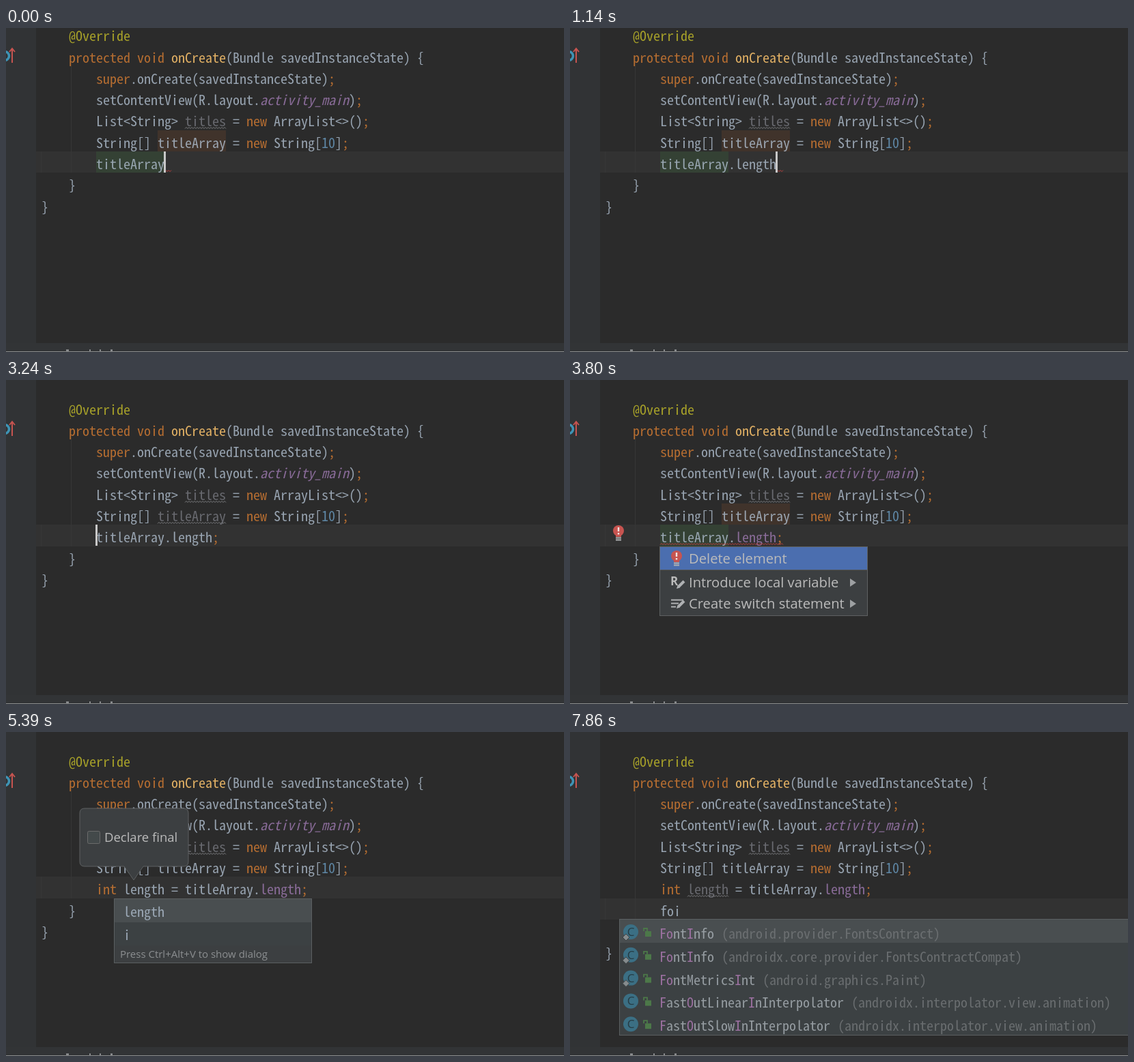
An HTML page for the animation above (8000 ms loop, 817 by 475 pixels).

```html
<!DOCTYPE html>
<html lang="en">
<head>
<meta charset="utf-8">
<title>Code editor</title>
<style>
html, body { margin: 0; width: 100%; height: 100%; overflow: hidden; background: #2b2b2b; }
svg { display: block; width: 817px; height: 475px; }
text { white-space: pre; }
.code { font-family: "Noto Sans Mono CJK SC", "Liberation Mono", monospace; fill: #a9b7c6; fill-opacity: .86; font-variant-ligatures: none; }
.ui { font-family: "Open Sans", "Noto Sans", sans-serif; font-size: 20.2px; fill: #bbbbbb; }
</style>
</head>
<body>
<svg id="stage" width="817" height="475"></svg>
<script>
const LOOP = 8000, CELL = 10, LEFT = 52, PITCH = 31.3, BASELINE = 26;
const stage = document.getElementById('stage');

const HEAD = [
  '    @Override',
  '    protected void onCreate(Bundle savedInstanceState) {',
  '        super.onCreate(savedInstanceState);',
  '        setContentView(R.layout.activity_main);',
  '        List<String> titles = new ArrayList<>();',
  '        String[] titleArray = new String[10];'
];
const PAD = '        ';
const USE = PAD + 'titleArray.length;';
const DECL = PAD + 'int length = titleArray.length;';

const MEMBERS = [
  ['f', 'length', ''], ['m', 'clone', '()'], ['m', 'equals', '(Object obj)'], ['m', 'hashCode', '()'],
  ['m', 'toString', '()'], ['m', 'getClass', '()'], ['m', 'notify', '()'], ['m', 'notifyAll', '()']
];
const LOOPS = [
  ['t', 'for', '', 'fo'], ['t', 'fori', 'Create iteration loop', 'fo'], ['t', 'foreach', 'Iterate collection', 'fo'],
  ['c', 'FontInfo', '(android.provider.FontsContract)', 'Fo'],
  ['c', 'Formatter', '(java.util)', 'Fo'], ['c', 'FontMetrics', '(android.graphics.Paint)', 'Fo']
];
const CLASSES = [
  ['s', 'FontInfo', '(android.provider.FontsContract)', 'FoI'],
  ['s', 'FontInfo', '(androidx.core.provider.FontsContractCompat)', 'FoI'],
  ['s', 'FontMetricsInt', '(android.graphics.Paint)', 'FoI'],
  ['c', 'FastOutLinearInInterpolator', '(androidx.interpolator.view.animation)', 'FOI'],
  ['c', 'FastOutSlowInInterpolator', '(androidx.interpolator.view.animation)', 'FOI']
];

// Each step changes only the named parts of the state before it.
const STEPS = [
  [0, { scroll: 0, body: [PAD + 'titleArray'], line: 6, caret: 18, marked: true, error: [18, 19] }],
  [280, { body: [PAD + 'titleArray.'], caret: 19, error: [19, 20] }],
  [400, { list: { x: 182, y: 212, items: MEMBERS } }],
  [990, { caret: null }],
  [1140, { body: [PAD + 'titleArray.length'], caret: 25, error: [25, 26], list: null }],
  [1510, { body: [USE], caret: 26, error: [8, 26], marked: false, resolved: true }],
  [1880, { bulb: true }],
  [2000, { caret: null, menu: { x: 310, y: 211, row: 0 } }],
  [2440, { scroll: 1, body: [], caret: 4, error: null, bulb: false, menu: null, braces: true, resolved: false }],
  [2710, { unusedArray: true }],
  [3240, { body: [USE], caret: 8, braces: false }],
  [3520, { unusedArray: false, marked: true, error: [8, 26], resolved: true }],
  [3800, { caret: null, bulb: true, menu: { x: 131, y: 244, row: 0 } }],
  [4380, { menu: { x: 131, y: 244, row: 1 } }],
  [4790, { menu: null }],
  [4940, { body: [DECL], caret: 18, bulb: false, marked: false, error: null, balloon: .5, names: true }],
  [5090, { balloon: 1 }],
  [5390, { caret: null }],
  [5950, { names: false, balloon: .5, caret: 18 }],
  [6070, { balloon: 0, caret: 39 }],
  [6190, { body: [DECL, ''], line: 7, caret: 8 }],
  [6310, { unusedLength: true }],
  [6720, { body: [DECL, PAD + 'f'], caret: 9 }],
  [6870, { body: [DECL, PAD + 'fo'], caret: 10, list: { x: 72, y: 274, items: LOOPS } }],
  [7020, { body: [DECL, PAD + 'foi'], caret: 11 }],
  [7140, { list: { x: 72, y: 274, items: CLASSES } }],
  [7860, { caret: null }]
];
const states = [];
STEPS.forEach(([time, change], i) => states.push({ ...states[i - 1], ...change, time }));

const pen = document.createElement('canvas').getContext('2d');
pen.font = '100px "Noto Sans Mono CJK SC", "Liberation Mono", monospace';
const codeSize = CELL * 100 / pen.measureText('0').width;

const esc = s => s.replace(/&/g, '&amp;').replace(/</g, '&lt;').replace(/>/g, '&gt;');
const colX = col => LEFT + col * CELL;
const box = (x, y, w, h, fill, more = '') => `<rect x="${x}" y="${y}" width="${w}" height="${h}" fill="${fill}" ${more}/>`;
const path = (d, stroke, width = 1, more = '') => `<path d="${d}" fill="none" stroke="${stroke}" stroke-width="${width}" ${more}/>`;
const label = (x, y, s, more = '') => `<text class="ui" x="${x}" y="${y}" ${more}>${esc(s)}</text>`;
const span = (s, fill, more = '') => `<tspan fill="${fill}" ${more}>${esc(s)}</tspan>`;
const codeText = (x, y, inner) => `<text class="code" font-size="${codeSize}" x="${x}" y="${y}">${inner}</text>`;

function wave(from, to, y, color) {
  let d = `M${from} ${y + 2}`;
  for (let x = from + 2, up = true; x <= to; x += 2, up = !up) d += `L${x} ${up ? y : y + 2}`;
  return path(d, color);
}

function colored(text, row, s) {
  const words = /@\w+|\w+|;|[^\w;@]+/g;
  return text.replace(words, (w, at) => {
    const before = text.slice(0, at);
    if (w === '@Override') return span(w, '#bbb529');
    if (/^(protected|void|super|new|int|;)$/.test(w)) return span(w, '#cc7832');
    if (w === 'onCreate' && row === 1) return span(w, '#ffc66d');
    if (w === 'activity_main') return span(w, '#9876aa', 'font-style="italic"');
    if (w === '10') return span(w, '#6897bb');
    if (w === 'length' && before.endsWith('.') && s.resolved) return span(w, '#9876aa');
    const unused = w === 'titles' || (w === 'titleArray' && row === 5 && s.unusedArray) ||
      (w === 'length' && before.endsWith('int ') && s.unusedLength);
    return unused ? span(w, '#72737a') : esc(w);
  });
}

function bulb(x, y) {
  return `<circle cx="${x}" cy="${y - 3}" r="8" fill="#c75450"/>` +
    box(x - 4, y + 2, 8, 4, '#c75450') +
    path(`M${x} ${y - 8}v6M${x} ${y}v2.5`, '#f0e4e2', 2.4) +
    path(`M${x - 4} ${y + 7.5}h8M${x - 4} ${y + 10.5}h8`, '#afb1b3', 1.8);
}

function pencil(x, y) {
  return path(`M${x} ${y}l8 -8`, '#afb1b3', 4) + `<path d="M${x - 3} ${y + 3}l1.5 -5 3.5 3.5z" fill="#afb1b3"/>`;
}

function menu({ x, y, row }) {
  const arrow = dy => `<path d="M279 ${dy - 6}l9 6 -9 6z" fill="#9da0a2"/>`;
  const tops = [1, 36, 68];
  return `<g transform="translate(${x} ${y})">` +
    box(.5, .5, 304, 101, '#3c3f41', 'stroke="#5e6162"') +
    box(1, tops[row], 303, row ? 32 : 33, '#4b6eaf') +
    path('M1 34.5H304', '#515456') +
    bulb(25, 17) +
    label(43, 25, 'Delete element') + label(43, 60, 'Introduce local variable') + label(43, 91, 'Create switch statement') +
    label(16, 57, 'R', 'style="font-size:17px;font-weight:700"') + pencil(28, 59) +
    path('M17 78.5h18M17 83.5h11M17 88.5h7', '#afb1b3', 2) + pencil(28, 88) +
    arrow(53) + arrow(84) + '</g>';
}

function icon(kind, x, y) {
  const [fill, letter] = { f: ['#967c40', 'f'], m: ['#93565f', 'm'], c: ['#3b6f84', 'C'], s: ['#3b6f84', 'C'], t: ['#63686a', ''] }[kind];
  let out = `<circle cx="${x}" cy="${y}" r="11" fill="${fill}"/>` +
    label(x, y + 6, letter, 'text-anchor="middle" style="font-size:17px;fill:#263b43"');
  if (kind === 's') out += `<path d="M${x - 7} ${y + 3}l5 5 -5 5 -5 -5z" fill="#858b8d" stroke="#3c4143"/>`;
  if (kind !== 't') {
    out += box(x + 21, y - 1, 9, 8, '#4c7849') + path(`M${x + 19} ${y - 1}v-4h5v4`, '#4c7849', 1.8);
  }
  return out;
}

function matched(name, letters) {
  let next = 0;
  return [...name].map(ch => ch === letters[next] ? (next++, span(ch, '#ab78b0')) : esc(ch)).join('');
}

function list({ x, y, items }) {
  const height = items.length * 34;
  let out = box(x + .5, y + .5, 760, height, '#3c4143', 'stroke="#5b5f61"') + box(x + 1, y + 1, 760, 34, '#494e50');
  items.forEach(([kind, name, tail, letters = ''], i) => {
    const base = y + 29 + i * 33.8;
    const nameX = x + 59;
    out += icon(kind, x + 17, base - 10) + codeText(nameX, base, span(name, '#a4abb1').replace(esc(name), matched(name, letters))) +
      codeText(nameX + name.length * CELL + (kind === 'm' ? 0 : 11), base, span(tail, '#717577'));
  });
  return out;
}

function nameList() {
  return box(158.5, 244.5, 289, 94, '#3c4143', 'stroke="#5b5f61"') + box(159, 245, 288, 34, '#494e50') +
    codeText(172, 271, 'length') + codeText(172, 305, 'i') +
    box(159, 313, 288, 25, '#3c3f41') +
    label(167, 331, 'Press Ctrl+Alt+V to show dialog', 'style="font-size:15px;fill:#8c8f91"');
}

function balloon(opacity) {
  return `<g opacity="${opacity}"><path d="M115 112H260q7 0 7 7V190q0 7 -7 7H201L187 217L173 197H115q-7 0 -7 -7V119q0 -7 7 -7z" fill="#3c3f41" stroke="#5e6162"/>` +
    box(119.5, 145.5, 18, 18, '#43494a', 'rx="2" stroke="#6b6b6b"') +
    label(144, 161, 'Declare final', 'style="font-size:18.5px"') + '</g>';
}

function gutter(shift) {
  const y = 41 + shift;
  return box(0, 0, 44, 462, '#313335') +
    `<circle cx="-2" cy="${y}" r="6.5" fill="none" stroke="#3e93b5" stroke-width="3.5"/>` +
    path(`M9 ${y + 10}V${y - 10}M5 ${y - 6}l4 -5 4 5`, '#c75450', 2);
}

function frame(s) {
  const rows = [...HEAD, ...s.body, '    }', '}'];
  const top = row => Math.round(181 + PITCH * (row - 6 + s.scroll));
  const end = rows.length - 2;
  const mark = (row, from, to, fill) => box(colX(from), top(row), (to - from) * CELL, top(row + 1) - top(row), fill);
  const under = (row, from, to, color) => wave(colX(from), colX(to), top(row) + 27.5, color);

  let out = box(0, 0, 817, 475, '#2b2b2b') + gutter(s.scroll * 31);
  out += box(44, top(s.line), 773, top(s.line + 1) - top(s.line), '#323232');
  out += path(`M95.5 ${top(2)}V${top(end)}M51.5 ${top(s.line)}V${top(s.line + 1)}`, '#373737');

  if (s.marked) out += mark(5, 17, 27, '#40332b') + mark(6, 8, 18, '#344134');
  if (s.braces) {
    out += mark(1, 55, 56, '#3b514d') + mark(end, 4, 5, '#3b514d') + box(27, top(1), 3, top(end + 1) - top(1), '#3b514d');
  }

  rows.forEach((text, row) => {
    const indent = text.length - text.trimStart().length;
    const inner = s.braces && row === end ? span('}', '#ffef28')
      : colored(text.slice(indent), row, s);
    out += codeText(colX(indent), top(row) + BASELINE, inner);
  });
  if (s.braces) out += codeText(colX(55), top(1) + BASELINE, span('{', '#ffef28'));

  out += under(4, 21, 27, '#7c7d80');
  if (s.unusedArray) out += under(5, 17, 27, '#7c7d80');
  if (s.unusedLength) out += under(6, 12, 18, '#7c7d80');
  if (s.error) out += under(6, ...s.error, '#bc3f3c');
  if (s.caret != null) out += box(colX(s.caret) - 1, top(s.line), 3, 31, '#c8c8c8');
  if (s.bulb) out += bulb(71, top(6) + 12);

  out += box(0, 462, 817, 12, '#323436') + box(0, 474, 817, 1, '#8b8d8e') +
    path('M88 472.5h4M122 472.5h2M137 472.5h2M153 472.5h3', '#a5a7a9', 2);
  if (s.balloon) out += balloon(s.balloon);
  if (s.names) out += nameList();
  if (s.list) out += list(s.list);
  if (s.menu) out += menu(s.menu);
  return out;
}

let shown;
const start = performance.now();
function tick() {
  const time = (performance.now() - start) % LOOP;
  const state = states.findLast(s => s.time <= time) || states[0];
  if (state !== shown) stage.innerHTML = frame(shown = state);
  requestAnimationFrame(tick);
}
tick();
</script>
</body>
</html>
```
